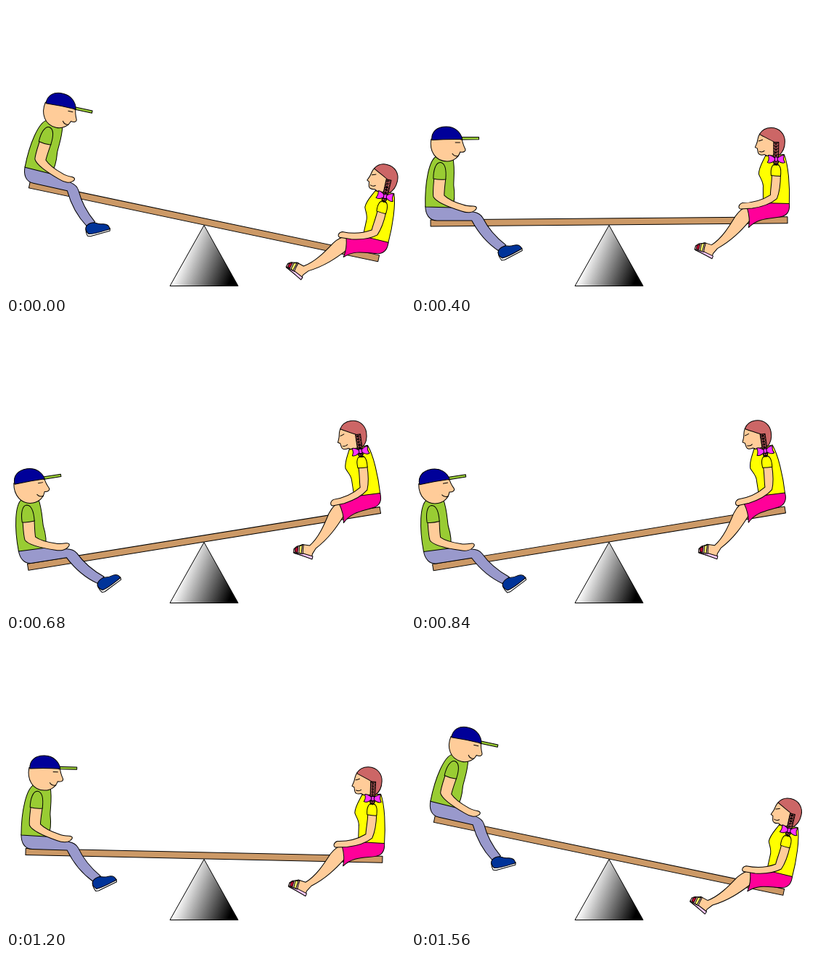
These frames come from a looping animation (550 by 400 pixels, 1600 ms). An HTML page with a canvas:

```html
<!DOCTYPE html>
<html lang="en">
<head>
<meta charset="utf-8">
<title>Seesaw</title>
<style>
  html, body { margin: 0; width: 100%; height: 100%; overflow: hidden; background: #fff; }
  canvas { display: block; width: 550px; height: 400px; }
</style>
</head>
<body>
<canvas id="stage" width="550" height="400"></canvas>
<script>
const ctx = document.getElementById('stage').getContext('2d');

const STEP = 40, STEPS = 40, TURN = 19, LAST = 39;
const SKIN = '#ffcc99', GREEN = '#99cc33', HAIR = '#cc6666', YELLOW = '#ffff00', BOW = '#ff33ff';

// A shape is [path, fill]; without a fill it is only outlined.
const shape = (d, fill) => ({ path: new Path2D(d), fill });

const boyShapes = [
  // trousers and shoe
  shape('M20 277C20 288 25 297 36 297L84 297C93 314 106 329 121 339L131 331C117 320 106 307 99 293C96 288 92 286 86 285L57 277Z', '#9999cc'),
  shape('M121 338C119 343 121 347 125 352L129 351.5L153.5 338.5L153 335Z', '#ffffff'),
  shape('M121 338C119 342 121 346 126 349C135 347 144 341 153 336C151 331 146 330 141 331.5C137 333 133 332 130 332C126 333 123 335 121 338Z', '#003399'),
  // shirt
  shape('M35 208C25 214 19 244 20 278L57 279C60 272 61 262 59 248C59 237 61 226 58 210Z', GREEN),
  // arm and sleeve
  shape('M32 238C31 249 30 258 31 264C35 272 54 279 70 284C78 287 85 286 88 283C92 280 91 277 86 277C80 277 77 277 72 275C62 272 51 267 46 262C46 255 47 248 48 239Z', SKIN),
  shape('M31 239C31 228 34 216 41 216.5C48 218 49 229 48 240Q39 241 31 239Z', GREEN),
  // head, face and cap
  shape('M28 184C25 201 34 215 50 215C59 215 66 209 68 202C73 203 76 201 75 198C73 194 71 190 70.5 183Z', SKIN),
  shape('M61 189L68 189'),
  shape('M57 204Q60 209 66 207.5'),
  shape('M69 181.5L93.8 181.5L93.8 184.8L69 185Z', GREEN),
  shape('M29 185.5C28 174 36 167 49 167C61 167 69 175 71 184.5Q50 184 29 185.5Z', '#000099')
];

const wing = side => {
  const x = n => 503 + side * n;
  return shape(`M${x(0)} 212C${x(4)} 209 ${x(7)} 206 ${x(11)} 207Q${x(9)} 212 ${x(12)} 217C${x(8)} 219 ${x(4)} 216 ${x(0)} 213Z`, BOW);
};

const hatch = () => {
  let d = '';
  for (let y = 190; y < 220; y += 4) {
    d += `M499.5 ${y}l6.5 3M506 ${y}l-6.5 3`;
  }
  return shape(d + 'M502.7 189V220');
};

const girlShapes = [
  // leg and sandal
  shape('M466 279C459 277 453 283 447 291C438 306 428 322 414 331L404 328L392 332L391 338L414 349L416 343L422 336C442 325 455 311 467 297Z', SKIN),
  shape('M390.5 337L392 335L416 346.5L414.5 350.2Z', '#ffccff'),
  shape('M391 337C391 333 393 331 396 329.5L406 328.5Q404 334 403 341Z', '#ffcccc'),
  shape('M394 331.5L393 336.5L396 338L398 330Z', '#cc0033'),
  shape('M400 329.5L398 339L401 340L404 329Z', '#ffff66'),
  // neck and shirt
  shape('M489 203L488 213L501 215L503 200Z', SKIN),
  shape('M488 208C484 217 479 224 479 233C481 239 486 244 485 252L485 274L521 275C522 250 520 221 514 206Z', YELLOW),
  // skirt
  shape('M485 273L521 274C522 284 519 291 508 292.5C491 295 478 294 465 307C467 297 466 290 463 280Z', '#ff0099'),
  // arm and sleeve
  shape('M497 234C497 245 495 255 495 262C484 269 469 273 456 273C451 275 450 280 454 281.5L470 280.5C486 278 497 273 504 267C508 257 509 245 509 234Z', SKIN),
  shape('M496 235C495 226 497 219 503 219C509 220 510 228 509 236Q503 236 496 235Z', YELLOW),
  // head
  shape('M481 177C477 181 478 187 476 191L474 196L477 197.5L478 203Q479 208 487 206L491 208L503 207L506 188Z', SKIN),
  shape('M480 178C484 171 490 169 496 169C508 169 515 178 515 188C515 197 512 203 507 207L500 207L501 189C494 185 487 182 480 178Z', HAIR),
  shape('M478.5 187.5Q481 187 484.5 185.5'),
  shape('M479.5 201.5Q484 203.5 487 200.5'),
  // braid and bow
  shape('M499.5 189H506.5L506 217L503 221L499.5 218Z', HAIR),
  hatch(),
  wing(-1),
  wing(1),
  shape('M501 209.5H505V215.5H501Z', BOW)
];

const plankShapes = [shape('M-246-4.5H246V4.5H-246Z', '#cc9966')];

// home: centre of the drawing; keys: [x, y, degrees] at start, turn and end.
const boy = { shapes: boyShapes, home: [86, 260], keys: [[94.4, 220, 12.6], [78.1, 296, -11.4], [95.2, 220, 12.6]] };
const girl = { shapes: girlShapes, home: [456, 260], keys: [[466.5, 299.7, 12.4], [447.3, 223.5, -11.2], [465, 300, 12.3]] };
const plank = { shapes: plankShapes, home: [0, 0], keys: [[273, 298.4, 11.95], [273, 298.4, -11.7], [273, 298.4, 11.85]] };

const shade = ctx.createLinearGradient(244, 345, 312, 372);
shade.addColorStop(0, '#fff');
shade.addColorStop(1, '#000');
const fulcrum = shape('M273 303.5L320 387.5H226Z', shade);

function paint({ path, fill }) {
  if (fill) {
    ctx.fillStyle = fill;
    ctx.fill(path);
  }
  ctx.stroke(path);
}

function pose(keys, step) {
  const falling = step <= TURN;
  const [from, to] = falling ? [keys[0], keys[1]] : [keys[1], keys[2]];
  const k = falling ? step / TURN : (step - TURN) / (LAST - TURN);
  return from.map((v, i) => v + (to[i] - v) * k);
}

function drawPart({ shapes, home, keys }, step) {
  const [x, y, degrees] = pose(keys, step);
  ctx.save();
  ctx.translate(x, y);
  ctx.rotate(degrees * Math.PI / 180);
  ctx.translate(-home[0], -home[1]);
  shapes.forEach(paint);
  ctx.restore();
}

function draw() {
  const step = Math.floor(performance.now() / STEP) % STEPS;
  ctx.fillStyle = '#fff';
  ctx.fillRect(0, 0, 550, 400);
  ctx.strokeStyle = '#000';
  ctx.lineWidth = 1;
  ctx.lineJoin = 'round';
  paint(fulcrum);
  [plank, boy, girl].forEach(part => drawPart(part, step));
  requestAnimationFrame(draw);
}
draw();
</script>
</body>
</html>
```
